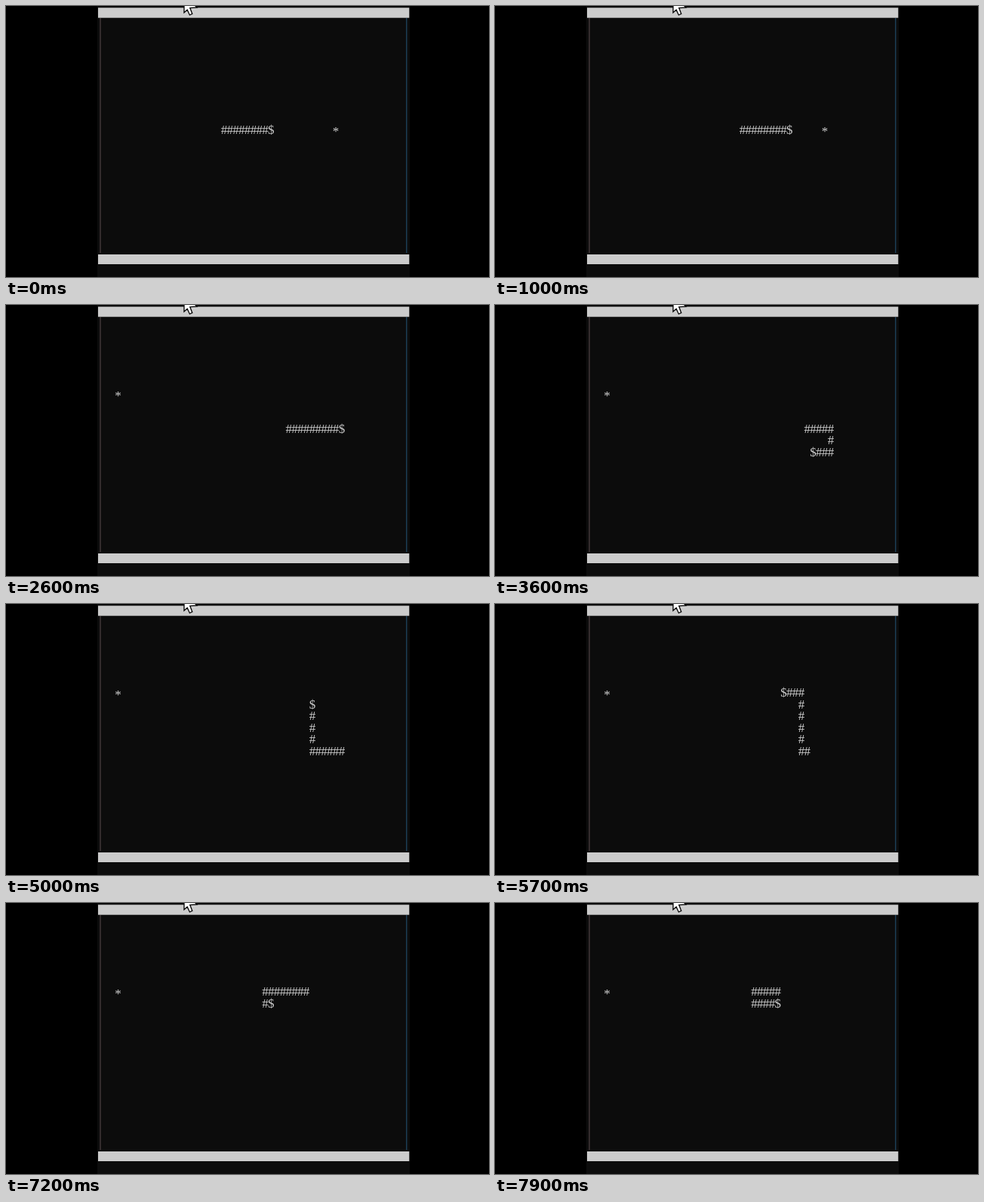
An HTML page with a canvas that plays this animation: 640x360 px, repeating every 8 s.

```html
<!DOCTYPE html>
<html lang="en">
<head>
<meta charset="utf-8">
<title>Console snake</title>
<style>
html, body { margin: 0; width: 100%; height: 100%; overflow: hidden; background: #000; }
canvas { display: block; }
</style>
</head>
<body>
<canvas id="stage" width="640" height="360"></canvas>
<script>
const ctx = document.getElementById('stage').getContext('2d');
const LOOP = 8000, STEP = 213.45, LEAD = 67.5;
const CELL_W = 7.8, CELL_H = 15.6;
const EAT_STEP = 11;

// Route as runs of [dx, dy, steps]; index 9 is the head's cell at step 0.
const START = 9;
const route = [[-START, 0]];
const runs = [[1, 0, START + 12], [0, 1, 2], [-1, 0, 5], [0, -1, 5],
              [-1, 0, 8], [0, 1, 1], [1, 0, 8]];
for (const [dx, dy, count] of runs) {
  for (let i = 0; i < count; i++) {
    const [x, y] = route[route.length - 1];
    route.push([x + dx, y + dy]);
  }
}

function rect(color, x, y, w, h) {
  ctx.fillStyle = color;
  ctx.fillRect(x, y, w, h);
}

function glyph(char, [col, row], dy = 0) {
  ctx.fillText(char, 351.3 + col * CELL_W, 169.8 + row * CELL_H + dy);
}

function drawConsole() {
  rect('#000', 0, 0, 640, 360);
  rect('#0c0c0c', 121, 0, 414, 360);
  rect('#cccccc', 122, 2.3, 412.3, 13.4);
  rect('#cccccc', 122, 330, 412.3, 13);
  rect('#4f4143', 124.4, 16, 1.2, 312);
  rect('#214a66', 530.2, 16, 1.2, 312);
}

function drawPointer() {
  ctx.beginPath();
  for (const [x, y] of [[236, -15], [236, 8.8], [240.2, 5], [243.4, 12],
                        [246.8, 10.4], [243.8, 2.6], [253, 2]]) ctx.lineTo(x, y);
  ctx.closePath();
  ctx.fillStyle = '#fff';
  ctx.fill();
  ctx.strokeStyle = '#000';
  ctx.lineWidth = 1.3;
  ctx.stroke();
}

function draw(now) {
  const step = Math.floor((now % LOOP + LEAD) / STEP);
  const head = START + step;
  const eaten = step >= EAT_STEP;
  const length = eaten ? 9 : 8;

  drawConsole();
  ctx.font = '17px "Liberation Serif", "Times New Roman", serif';
  ctx.textAlign = 'center';
  ctx.fillStyle = '#cccccc';
  for (let i = head - length; i < head; i++) glyph('#', route[i]);
  glyph('$', route[head]);
  glyph('*', eaten ? [-26, -3] : [11, 0], 2.5);
  drawPointer();
  requestAnimationFrame(draw);
}

requestAnimationFrame(draw);
</script>
</body>
</html>
```
